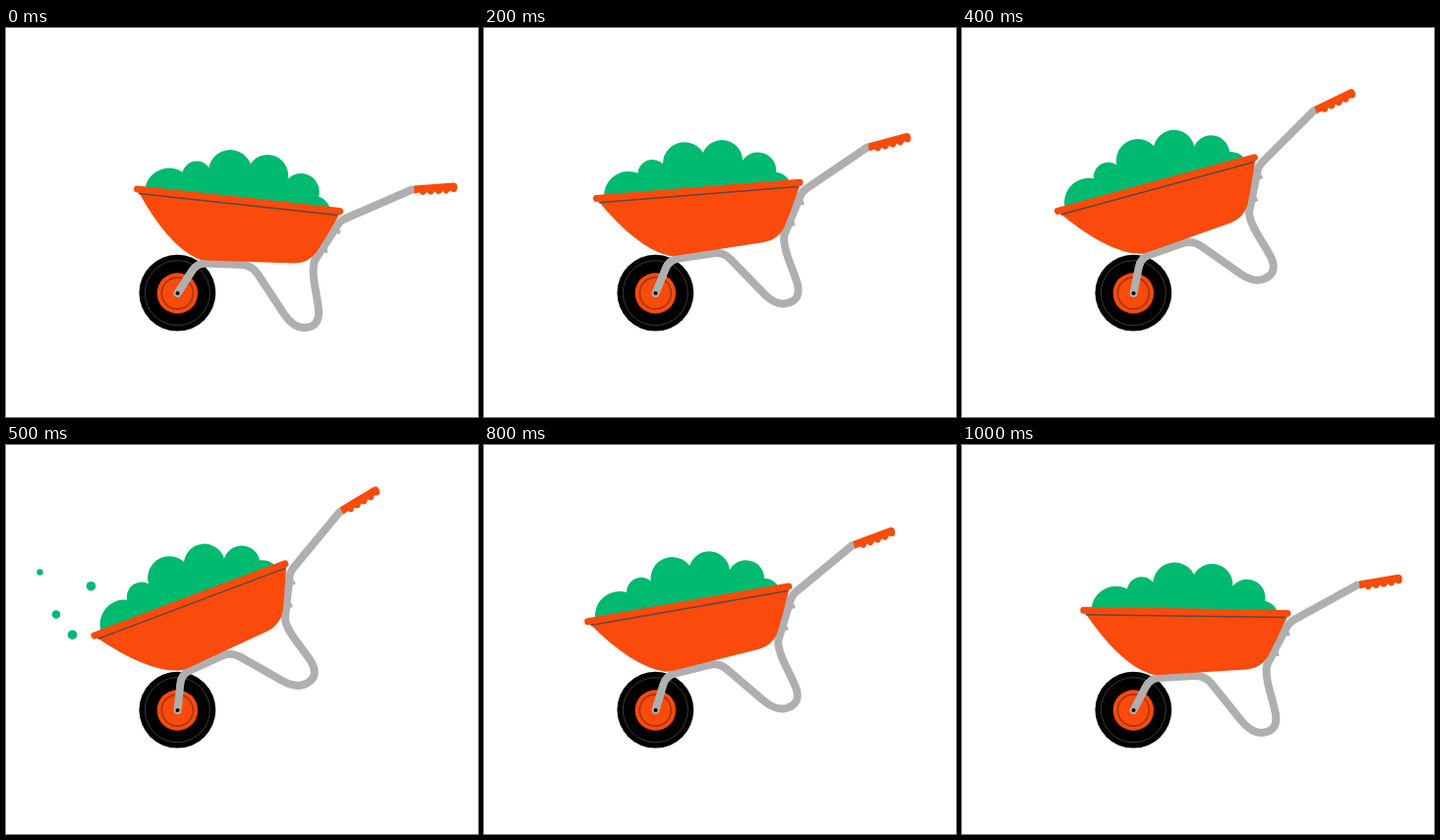
Recreate the animation shown at these times as an HTML page. Size 480 by 396 pixels, loop 1.1 s.

```html
<!DOCTYPE html>
<html lang="en">
<head>
<meta charset="utf-8">
<title>Wheelbarrow</title>
<style>
  html, body { margin: 0; width: 100%; height: 100%; overflow: hidden; background: #fff; }
  svg { display: block; width: 480px; height: 396px; }
  .orange { fill: #fa4a0c; }
  .green { fill: #00ba70; }
  .line { fill: none; stroke-linejoin: round; }
</style>
</head>
<body>
<svg viewBox="0 -0.5 480 396">
  <g id="wheel">
    <circle cx="174.3" cy="269.2" r="38.9"/>
    <circle class="line" cx="174.3" cy="269.2" r="33" stroke="#3a3a3a"/>
    <circle class="orange" cx="174.3" cy="269.5" r="20.7"/>
    <circle class="line" cx="174.3" cy="269.5" r="16" stroke="#a8380f" stroke-width="1.8"/>
  </g>

  <g id="barrow">
    <g class="green">
      <circle cx="166" cy="167" r="25"/>
      <circle cx="194" cy="150" r="15"/>
      <circle cx="228" cy="145.5" r="22"/>
      <circle cx="266" cy="149.5" r="21"/>
      <circle cx="300" cy="166.3" r="18.7"/>
      <circle cx="313" cy="187.5" r="17"/>
      <path d="M150 164L194 146L228 140L266 145L300 162L320 182Z"/>
    </g>

    <path class="line" stroke="#afafaf" stroke-width="8" stroke-linecap="round"
      d="M174.5 269.5L189 247Q194 239 203 239L240 240.5Q250 241 256 250L283 291Q292 304 302 304.5Q318 305 318 289Q318 284 314 262Q311 244 314 236L338 199Q340 196 345 193.5L413 164"/>
    <path class="line" stroke="#afafaf" stroke-width="4" d="M335 207h5M322 226.5h5"/>

    <path class="orange" d="M134 165Q164 220 194 234Q198 236 204 236L293 239Q307 239 315.500 228Q324 215 340.500 187Z"/>
    <path class="line" stroke="#fa4a0c" stroke-width="7" stroke-linecap="round" d="M133.5 163.5L339.5 186"/>
    <path class="line" stroke="#5a4a44" stroke-width="1.5" d="M135 168L337 190"/>

    <path class="orange" d="M415 160L455 157Q459 157 459 161Q459 167 455 166.5Q453 166 451.5 165Q448 171 444 165.5Q440 171.5 436 166Q432 172 428 166.5Q424 172.5 420.5 167L415 168Z"/>
    <circle cx="174.5" cy="269.5" r="2"/>
  </g>

  <g id="crumbs" class="green">
    <circle cx="34.5" cy="129" r="3.2"/>
    <circle cx="86.5" cy="143.2" r="4.8"/>
    <circle cx="51" cy="172" r="4.3"/>
    <circle cx="67.5" cy="192.7" r="4.8"/>
  </g>
</svg>
<script>
  const LOOP = 1100, STEP = 100, TILT = 5.38;
  const barrow = document.getElementById('barrow');
  const crumbs = document.getElementById('crumbs');

  function draw(now) {
    const step = Math.floor((now % LOOP) / STEP);
    // Five steps up, one step held, five steps down.
    const angle = -TILT * Math.min(step, 11 - step);
    barrow.setAttribute('transform', `rotate(${angle} 174.5 269.5)`);
    crumbs.style.visibility = step >= 5 && step <= 7 ? 'visible' : 'hidden';
  }

  const start = performance.now();
  function tick() {
    draw(performance.now() - start);
    requestAnimationFrame(tick);
  }
  tick();
</script>
</body>
</html>
```
